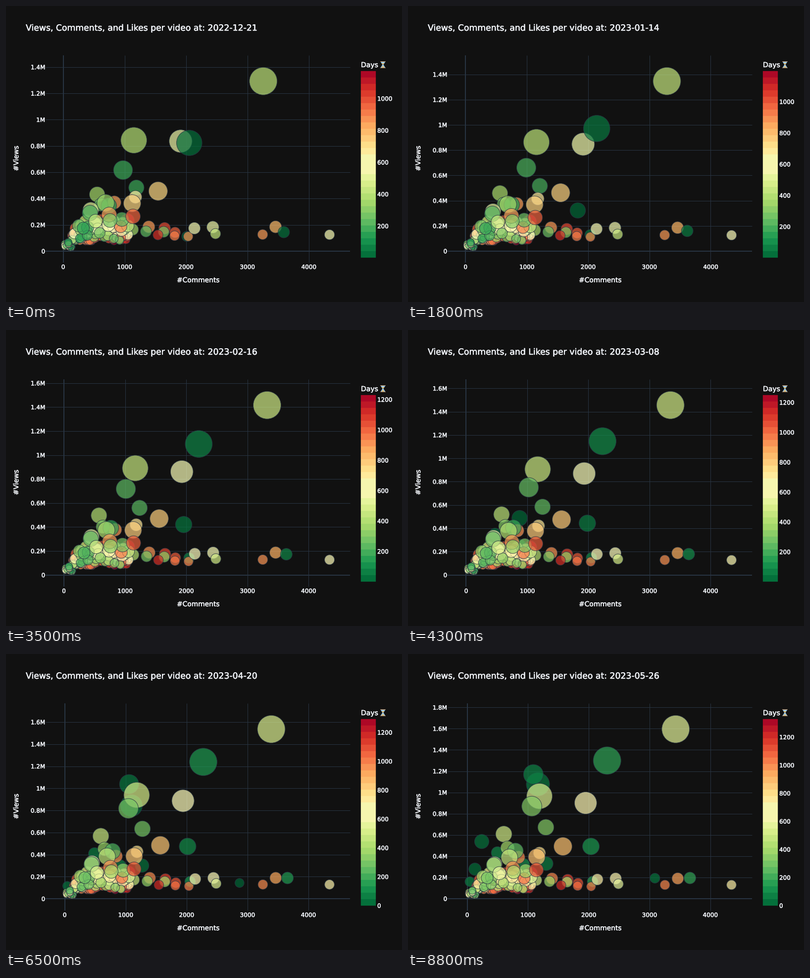
These frames come from a looping animation (800 px wide and 600 px high, 8900 ms). A matplotlib script:

```python
import numpy as np
import matplotlib
import matplotlib.pyplot as plt
from matplotlib.animation import FuncAnimation
from matplotlib.patches import Polygon, Rectangle
from matplotlib.patheffects import withStroke

FRAMES, STEP_MS, LAST_DAY = 89, 100, 156
BG, GRID, INK = "#111111", "#283442", "#f2f5fa"
PX = 0.72  # points per pixel at 100 dpi
START = np.datetime64("2022-12-21")
CMAP = matplotlib.colormaps["RdYlGn_r"]
BAR_TOP, BAR_BOTTOM, BANDS = 132, 510, 29

# pace of the calendar: frame -> day
PACE = ([0, 10, 26, 43, 55, 73, 88], [0, 14, 35, 77, 104, 133, 156])

# day of publishing, final comments, final views (thousands), growth power, final radius
FRESH = [
    (105, 1165, 1077, 0.20, 23.5), (76, 1090, 1170, 0.20, 20), (20, 2037, 492, 0.12, 17),
    (60, 498, 432, 0.12, 12.5), (122, 240, 538, 0.15, 14.5), (118, 3090, 193, 0.10, 10),
    (85, 1300, 330, 0.13, 14), (40, 924, 320, 0.20, 13), (140, 128, 278, 0.30, 12.5),
    (90, 45, 160, 0.40, 10), (112, 608, 237, 0.40, 9),
]
POPULAR = [
    (-390, 1190, 965, 0.40, 26), (-535, 1950, 901, 0.29, 22.5), (-20, 2303, 1300, 0.21, 28),
    (-175, 1063, 870, 0.54, 20.3), (-172, 1295, 672, 0.51, 16.3), (-350, 603, 608, 0.93, 16.5),
    (-720, 1576, 492, 0.38, 18.5), (-650, 1190, 430, 0.20, 12.5), (-720, 1145, 392, 0.38, 17),
    (-840, 845, 390, 0.30, 13), (-240, 664, 478, 0.60, 14), (-100, 794, 450, 0.28, 16),
]
# day of publishing, final comments, final views
STEADY = [
    (-500, 450, 325), (-190, 440, 318), (-330, 695, 388), (-830, 750, 285), (-150, 330, 195),
    (-420, 530, 240), (-270, 766, 250), (-950, 1140, 271), (-850, 1397, 190), (-230, 1356, 162),
    (-1000, 1655, 178), (-270, 1645, 157), (-1050, 1546, 126), (-960, 1825, 146),
    (-900, 1818, 120), (-15, 2065, 162), (-870, 2040, 115), (-560, 2143, 181),
    (-540, 2444, 190), (-420, 2489, 139), (-850, 3255, 130), (-790, 3466, 190),
    (-25, 3666, 195), (-570, 4350, 130),
]


def crowd(n, rng):
    """Ordinary videos: the old ones sit low and behind, the young ones higher."""
    old = rng.random(n) < 0.62
    born = -np.where(old, rng.uniform(830, 1160, n), rng.uniform(120, 700, n))
    x = 140 + 1150 * rng.beta(1.25, 2.4, n)
    reach = 70 + 120 * np.minimum(1, x / 450)
    v = 78 + reach * np.where(old, rng.beta(1.0, 2.3, n), rng.beta(1.3, 1.8, n))
    order = np.argsort(born + rng.normal(0, 250, n))
    return np.column_stack([born, x, v])[order]


def beginners(n, rng):
    """Tiny videos next to the origin; the greener ones have more views."""
    age = rng.uniform(40, 750, n)
    x = rng.uniform(10, 160, n)
    v = rng.uniform(15, 38, n) + np.where(x < 110, rng.uniform(0, 65, n) * (1 - age / 900), 0)
    return np.column_stack([-age, x, v])


def with_rule(rows):
    """Slow growth, and a circle area that follows the views."""
    rows = np.asarray(rows, float)
    n = len(rows)
    return np.column_stack([rows, np.full(n, 0.15), 0.86 * np.sqrt(rows[:, 2]), np.full(n, 0.01)])


def with_comments(rows):
    """Comments grow four times slower than views."""
    rows = np.asarray(rows, float)
    return np.column_stack([rows, rows[:, 3] / 4])


rng = np.random.default_rng(5)
VIDEOS = np.vstack([with_comments(FRESH), with_rule(crowd(150, rng)), with_rule(beginners(30, rng)),
                    with_comments(POPULAR), with_rule(STEADY)])


def top_views(day):
    return 1293 + 2.3 * day - 0.0023 * day ** 2


def videos_on(day):
    """Comments, views, radius and age of everything published by this day."""
    born, x, v, power, r, x_power = VIDEOS[VIDEOS[:, 0] < day].T
    part = (day - born) / (LAST_DAY - born)
    top = top_views(day)
    size = part ** (0.3 * power) / (top / top_views(LAST_DAY)) ** 0.25
    rows = np.column_stack([x * part ** x_power, v * part ** power, r * size, day - born])
    leader = (3260 + 1.1 * day, top, 28, 410 + day)
    return np.vstack([rows, leader]).T


fig = plt.figure(figsize=(8, 6), dpi=100, facecolor=BG)
ax = fig.add_axes([0, 0, 1, 1])
ax.set(xlim=(0, 800), ylim=(600, 0))
ax.axis("off")


def label(x, y, s="", size=12, **kw):
    return ax.text(x, y, s, fontsize=size * PX, color=INK, family="DejaVu Sans", va="baseline",
                   zorder=5, path_effects=[withStroke(linewidth=0.35, foreground=INK)], **kw)


def rule(wide=False):
    return ax.plot([], [], color=GRID, lw=(2 if wide else 1) * PX, zorder=1,
                   solid_capstyle="butt")[0]


def bar_y(days, low, high):
    return BAR_BOTTOM - (days - low) / (high - low) * (BAR_BOTTOM - BAR_TOP)


title = label(40, 50, size=17.25)
label(388, 560, "#Comments", 13.8, ha="center")
label(25, 309, "#Views", 13.8, ha="center", rotation=90, rotation_mode="anchor")
label(717, 124, "Days", 14)

# hourglass
ax.add_patch(Polygon([(757, 113), (766, 113), (762.3, 119), (766, 125), (757, 125),
                      (760.7, 119)], fc="#a9cfe6", ec="#7fa9c4", lw=0.5, zorder=5))
for tip, base in ((119, 116), (121.5, 124.5)):
    ax.add_patch(Polygon([(759, base), (764, base), (761.5, tip)], fc="#f2b84b", zorder=6))
for y in (112, 124.8):
    ax.add_patch(Rectangle((756, y), 11, 1.4, fc="#b98a5b", zorder=7))

# colour bar
band_h = (BAR_BOTTOM - BAR_TOP) / BANDS
for i in range(BANDS):
    t = 1 - (i + 0.5) / BANDS
    color = "#f6f6ae" if abs(t - 0.5) < 0.05 else CMAP(t)
    ax.add_patch(Rectangle((717, BAR_TOP + i * band_h), 30, band_h, fc=color, ec=color,
                           lw=0.2, zorder=4))

x_ticks = [(k, rule(k == 0), label(0, 533, str(k), ha="center")) for k in range(0, 5000, 1000)]
y_ticks = [(k, rule(k == 0), label(79, 0, f"{k / 1000:g}M" if k else "0", ha="right"))
           for k in range(0, 2000, 200)]
bar_ticks = [(k, label(750, 0, str(k))) for k in range(0, 1400, 200)]
dots = ax.scatter([], [], linewidths=PX, zorder=3)


def draw(frame):
    day = int(round(np.interp(frame, *PACE)))
    p = day / LAST_DAY
    x0, x_scale = 115.5 + 4 * p, (496 - 5 * p) / 4000
    y0 = 497 - p
    y_scale = (y0 - 152.3) / top_views(day)  # the leader keeps its height

    title.set_text(f"Views, Comments, and Likes per video at: {START + day}")
    for k, line, text in x_ticks:
        x = x0 + k * x_scale
        line.set_data([x, x], [100, 520])
        text.set_x(x)
    for k, line, text in y_ticks:
        y = y0 - k * y_scale
        line.set_data([80, 695], [y, y])
        text.set_y(y + 4.5)
        line.set_visible(y >= 100)
        text.set_visible(y >= 100)

    low, high = round(2 * (1 - p)), 1172 + day
    if day > 110:
        low = 0
    for k, text in bar_ticks:
        text.set_y(bar_y(k, low, high) + 4.5)
        text.set_visible(low <= k <= high)

    x, v, r, age = videos_on(day)
    dots.set_offsets(np.column_stack([x0 + x * x_scale, y0 - v * y_scale]))
    dots.set_sizes((2 * r * PX) ** 2)
    dots.set_facecolors(CMAP((age - low) / (high - low), alpha=0.7))
    dots.set_edgecolors(matplotlib.colors.to_rgba(GRID, 0.85))
    return []


anim = FuncAnimation(fig, draw, frames=FRAMES, interval=STEP_MS, init_func=lambda: [],
                     repeat=True, repeat_delay=0)
plt.show()
```
